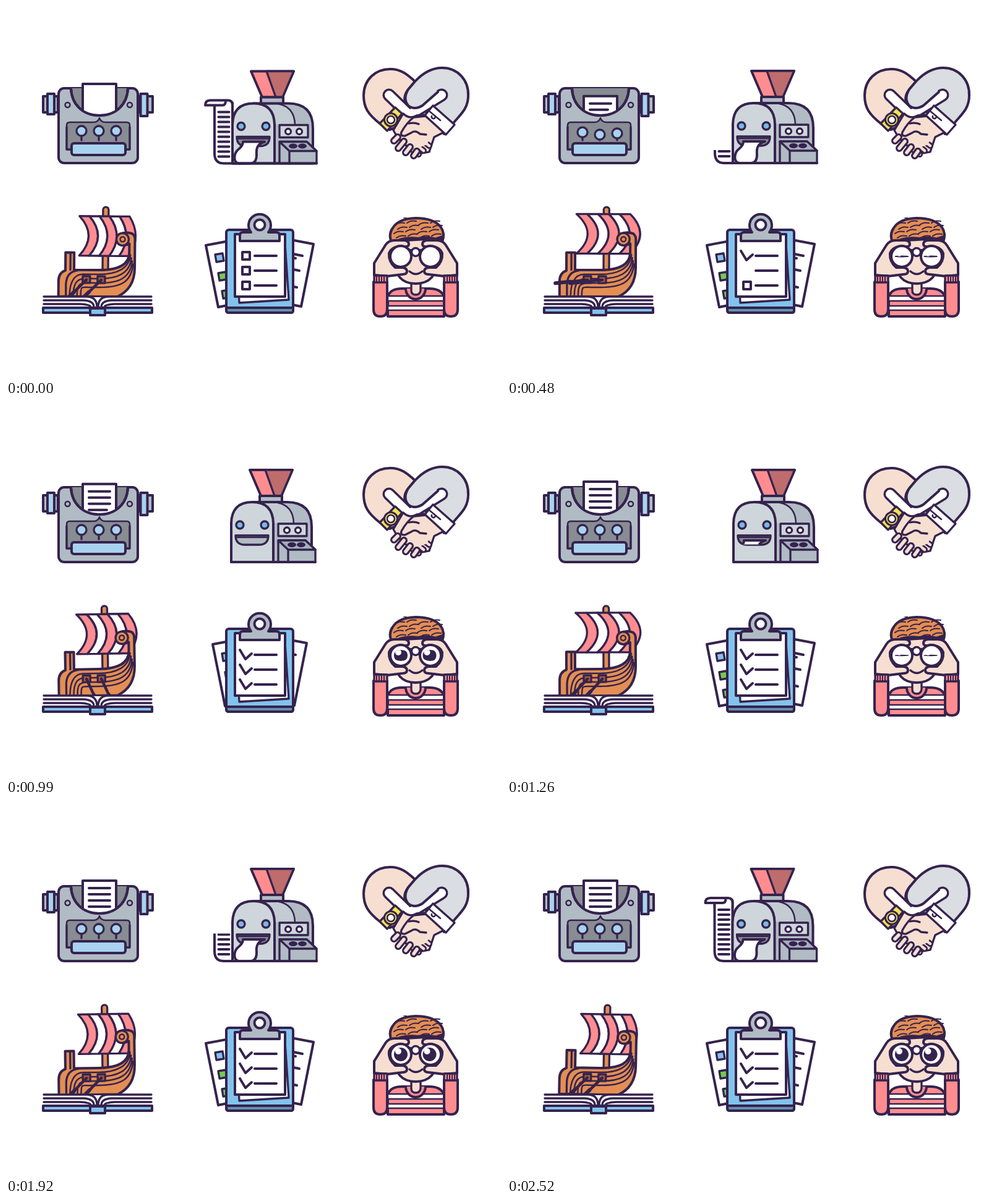
An HTML page that plays this animation: 800x600 px, repeating every 2.55 s.

```html
<!DOCTYPE html>
<html lang="en">
<head>
<meta charset="utf-8">
<title>Six icons</title>
<style>
html, body { margin: 0; width: 100%; height: 100%; overflow: hidden; background: #fff }
svg { display: block; width: 100vw; height: 100vh; stroke: #35234e; stroke-width: 4; stroke-linejoin: round; stroke-linecap: round; fill: none }
.w { fill: #fff } .g { fill: #b1bbc4 } .d { fill: #878d92 } .l { fill: #ced6db } .b { fill: #a9d2ee }
.c { fill: #82c3ec } .p { fill: #ff8d90 } .s { fill: #f6dfd1 } .o { fill: #e48e53 } .k { fill: #35234e }
.t { stroke-width: 2.5 } .m { stroke-width: 3.3 } .n { stroke: none }
</style>
</head>
<body>
<svg viewBox="0 0 800 600">
<defs>
  <clipPath id="slot"><path d="M100 90H200V133H196C195 160 176 177 151 177S106 160 105 133H100Z"/></clipPath>
  <clipPath id="tongueClip"><rect id="tongueBox" x="355" y="215" width="80"/></clipPath>
  <clipPath id="stripClip"><rect id="stripBox" width="120" height="150"/></clipPath>
  <clipPath id="curlClip"><rect id="curlBox" y="140" width="80" height="30"/></clipPath>
  <clipPath id="water"><rect x="40" y="300" width="220" height="170"/></clipPath>
  <clipPath id="lids"><ellipse id="lidL" cx="638" cy="405" rx="14"/><ellipse id="lidR" cx="685.500" cy="405" rx="14"/></clipPath>
</defs>

<g id="typewriter">
  <path class="g" d="M60 146h24v26H60zM214 146h23v26H214z"/>
  <path class="b" d="M67 142h11v33H67zM217.500 142h11v36h-11z"/>
  <rect class="g" x="85" y="133" width="128" height="121" rx="9"/>
  <path class="d" d="M105 133C106 160 125 177 151 177S196 160 197 133"/>
  <g clip-path="url(#slot)"><g id="sheet"><rect class="w" x="124" y="0" width="54" height="90"/><path id="typed"/></g></g>
  <path d="M105 133C106 160 125 177 151 177S196 160 197 133"/>
  <g class="t"><circle cx="99.500" cy="160" r="4"/><circle cx="200" cy="160" r="4"/>
  <path class="d" d="M98 232V193q0-5 5-5h38q8 0 10-7 2 7 10 7h34q5 0 5 5v39Z"/></g>
  <path class="m" d="M106 232h-8v-36M193 232h7v-36"/>
  <g id="keys" class="m b"></g>
  <rect class="b" x="106" y="222" width="87" height="19" rx="4"/>
</g>

<g id="machine">
  <g clip-path="url(#stripClip)">
    <path class="w" d="M337 156V238Q337 254 352 254H385L366 236V156"/>
    <path id="stripLines"/>
  </g>
  <g clip-path="url(#curlClip)"><path class="w" d="M337 166V160H322Q322 152 330 152H359Q366 152 366 160V168M337 160H350Q355 160 355 153"/></g>
  <path class="g" d="M400 157H456Q496 157 496 197V254H433"/>
  <path class="n" d="M400 159H441Q466 164 467 191H434Z" fill="#c3ccd2"/>
  <path class="t" d="M441 158Q466 163 467 191"/>
  <path class="l" d="M366 254V191Q367 157 400 157T434 191V254Z"/>
  <path class="p" d="M396 105H465L447 147H414Z"/>
  <path class="m" fill="#bf6c6d" d="M421 105H465L447 147H436Z"/>
  <path class="g" d="M412 147h36v10h-36z"/>
  <g class="m"><g fill="#78b8e4"><circle cx="380" cy="194" r="6"/><circle cx="420" cy="194" r="6"/></g>
  <path class="l" d="M442 192h46v20h-46z"/><circle class="w" cx="456" cy="202.500" r="4.500"/><circle class="w" cx="474" cy="202.500" r="4.500"/></g>
  <path id="mouth" class="m" d="M373 211H426Q426 226 411 226H388Q373 226 373 211Z"/>
  <path class="t" d="M376 214H423"/>
  <g clip-path="url(#tongueClip)"><path class="w" d="M383 219H418C406 222 404 230 405 240 405 249 402 254 395 254H377C367 254 367 238 376 231 381 227 383 224 383 219Z"/></g>
  <g class="m"><path class="g" d="M442 219H486L502 234V254H442Z"/><path fill="#a3afb9" d="M442 219H486L502 234H458Z"/><path d="M458 234V254"/></g>
  <g class="k n"><ellipse cx="464" cy="226" rx="7" ry="4"/><ellipse cx="479" cy="226" rx="7" ry="4"/></g>
  <path d="M366 254H502"/>
</g>

<g id="handshake">
  <path class="s" d="M604 190C585 175 578 164 578 145 578 119 597 102 621 102 638 102 648 110 661 122L690 150 650 190 620 200Z"/>
  <path fill="#dadde1" d="M661 122C675 107 689 100 705 100 730 100 748 120 747 145 747 165 736 174 725 187L708 207 672 164Q660 170 649 161 639 150 650 135Z"/>
  <path d="M619 144L652 176 704 144" style="stroke-width:21"/>
  <path d="M619 144L652 176 704 144" style="stroke:#fff;stroke-width:14"/>
  <path class="n" fill="#dadde1" d="M661 124L650 136Q641 150 650 160 660 168 673 161L697 139 690 118Z"/>
  <path d="M661 122L650 135Q641 150 650 161 660 169 673 161L698 139"/>
  <g class="m">
    <path class="s" d="M626 201L642 174Q652 184 664 177L678 176 708 204 692 212 684 236 662 240 633 213Z"/>
    <path class="s" d="M676 220l8 6M666 227l9 7M656 232l11 8" style="stroke-width:10"/>
    <path d="M676 220l8 6M666 227l9 7M656 232l11 8" style="stroke:#f6dfd1;stroke-width:4.500"/>
    <path class="n s" d="M640 196L664 182 690 206 680 224 660 232 640 216Z"/>
    <path class="s" d="M678 178L659 180Q648 188 639 204 637 211 645 210L655 205Q662 200 669 207L679 208"/>
    <path d="M651 190Q660 188 667 191"/>
    <path d="M633 212l-6 6M643 219l-9 11M653 228l-7 9M664 235l-5 7" style="stroke-width:12"/>
    <path d="M633 212l-6 6M643 219l-9 11M653 228l-7 9M664 235l-5 7" style="stroke:#f6dfd1;stroke-width:5.500"/>
    <path class="w" d="M690 161L725 192 711 208 677 177Z"/><path class="t" d="M684 170L702 185M688 178a3 3 0 1 0 5-1"/>
    <path fill="#f4e354" d="M604 190L629 164 640 174 616 202Z"/>
    <circle cx="622" cy="184" r="10.500" fill="#f4e354" style="stroke-width:3"/><circle class="w t" cx="622" cy="184" r="6"/>
  </g>
</g>

<g id="boat">
  <rect class="o m" x="156" y="325" width="9" height="105" rx="4.500"/>
  <g id="sail" class="m"></g>
  <path class="o" d="M85 470V445Q85 432 96 428V399H110V427H150C182 427 199 418 199 398V384Q190 389 182 385 175 376 182 369 194 364 204 368 209 372 208 380V423C208 448 197 462 180 470Z"/>
  <path class="m" d="M104 400V427M97 468V450Q98 430 116 428"/>
  <path id="planks" class="t"/>
  <circle class="o m" cx="188" cy="377" r="10"/><circle class="o t" cx="188" cy="377" r="4"/>
  <path class="m" fill="#a85a36" d="M124 437h12v11h-12zM148 437h12v11h-12z"/>
  <g clip-path="url(#water)"><path id="oars" style="stroke-width:4.500"/><path id="blades" style="stroke-width:6"/></g>
</g>
<g id="book">
  <path class="n w" d="M60 471h176v17H60z"/>
  <path class="c" d="M60 488H236V496H60Z"/><path class="c" d="M136 489h24v11h-24z"/>
  <path id="pages" class="m"/>
</g>

<g id="clipboard">
  <g id="leftSheet"><path class="w" d="M323 387L403 372 423 471 343 487Z"/>
    <g class="m"><path class="c" d="M338 402l12-2 2 12-12 2z"/><path fill="#74cc4e" d="M343 432l12-2 2 12-12 2zM349 461l12-2 2 12-12 2z"/></g></g>
  <g id="rightSheet"><path class="w" d="M497 385L418 370 398 470 477 486Z"/><path d="M440 396L479 404M440 402L468 408M440 421L474 428M440 449L470 455"/></g>
  <rect class="c" x="356" y="362" width="108" height="134" rx="4"/><path fill="#6292af" d="M356 488H464V493Q464 496 460 496H360Q356 496 356 492Z"/>
  <path class="w m" d="M372 372L450 370 457 475 377 480Z"/>
  <path class="w" d="M370 369h81v101h-81z"/>
  <g id="rows"></g>
  <path class="g" d="M378 380V371Q378 366 383 366H396A18 18 0 1 1 424 366H437Q442 366 442 371V380Z"/><circle class="w" cx="410" cy="354" r="8.500"/>
</g>

<g id="boy">
  <path class="p" d="M617 502V471Q620 457 640 457H684Q704 457 708 471V502Z"/>
  <path class="w t" d="M617 469H708V477H617ZM617 485H708V492H617Z"/>
  <path class="p" d="M646 457a16 17 0 0 0 32 0"/>
  <path class="s m" d="M655 440V460Q655 467 662 467T670 460V440"/>
  <path class="s" d="M628 380V410C628 436 640 449 662 449S697 436 697 410V376Z"/>
  <path class="o" d="M624 384Q617 370 625 359 634 344 662 343 692 343 703 358 710 368 705 382 692 372 666 376 640 373 624 384Z"/>
  <path id="hair" style="stroke-width:2"/>
  <path class="n k" d="M641 342h7v3zM690 376l15-5v9z"/>
  <path class="m" d="M652 429q10 9 21 0"/>
  <path d="M653 395H671"/>
  <g id="arm">
    <path class="p" d="M594 446H616V491Q616 502 605 502T594 491Z"/>
    <path class="s" d="M595 435V416L613 387Q618 379 628 379H644Q651 380 651 385T643 389Q624 387 619 400 618 414 629 423H641Q648 424 648 429T641 434L616 437Z"/>
    <path class="p m" d="M595 436h21v11h-21z"/><path style="stroke-width:2" d="M599 438v8M603 438v8M607 438v8M611 438v8"/>
    <circle class="w" cx="638" cy="405" r="17"/>
  </g>
  <use href="#arm" transform="translate(1324) scale(-1 1)"/>
  <circle class="w m" cx="662" cy="398" r="6.500"/>
  <g class="n" clip-path="url(#lids)">
    <g class="k"><circle cx="638" cy="405" r="11"/><circle cx="684.500" cy="405" r="11"/></g>
    <g class="w"><circle cx="634" cy="400" r="5"/><circle cx="680.500" cy="400" r="5"/></g>
  </g>
</g>
</svg>
<script>
const LOOP = 2550, STEP = 30;
const $ = id => document.getElementById(id);
const set = (id, attrs) => { for (const a in attrs) $(id).setAttribute(a, attrs[a]); };
const clamp = v => Math.max(0, Math.min(1, v));
const times = (n, f) => Array.from({ length: n }, (_, i) => f(i)).join('');

// Piecewise curve through [time, value] pairs.
function track(t, pts, ease = u => u) {
  const i = pts.findIndex(p => p[0] > t);
  if (i === 0) return pts[0][1];
  if (i < 0) return pts[pts.length - 1][1];
  const [t0, a] = pts[i - 1], [t1, b] = pts[i];
  return a + (b - a) * ease((t - t0) / (t1 - t0));
}
const smooth = u => u * u * (3 - 2 * u);

// Static repeats
set('stripLines', { d: times(10, i => `M343.500 ${171 + 8 * i}H360.500`) });
set('pages', { d: times(3, i => {
  const y = 470 + 6 * i, foot = 1 + 5 * i, bend = 16 + 6 * i;
  const half = side => `M${148 + 87 * side} ${y}H${148 + bend * side}Q${148 + foot * side} ${y + 1} ${148 + foot * side} 487`;
  return half(-1) + half(1);
}) });
set('planks', { d: times(4, i => {
  const y = 434 + 7 * i;
  return `M${103 + 6 * i} 468C${103 + 6 * i} 452 ${108 + 5 * i} ${y} ${124 + 4 * i} ${y}H150C${178 + 3 * i} ${y} ${199 + i} ${y - 9} ${201 + 1.5 * i} ${402 + 5 * i}`;
}) });
set('hair', { d: times(16, i => {
  const row = i >> 2, x = 629 + 19 * (i % 4) + 5 * (row % 2) - row, y = 354 + 7 * row - 3 * (i % 2);
  return `M${x} ${y}q6-5 15-3`;
}) });

function typewriter(t) {
  const y = track(t, [[0, 126], [120, 158.5], [1100, 124]]);
  set('sheet', { transform: `translate(0 ${y})` });
  set('typed', { d: times(4, i => {
    const p = clamp((t - 255 * i - (i ? 55 : 120)) / (i ? 200 : 135));
    return p ? `M134 ${12 + 10 * i}h${34 * p}` : '';
  }) });
  const active = t > 60 && t < 960;
  $('keys').innerHTML = times(3, i => {
    const phase = [-1.2, 0, .84][i], x = 122 + 28 * i;
    const cy = 202 + (active ? 6 * Math.max(0, Math.cos(t / 240 * 2 * Math.PI - phase)) : 0);
    return `<path d="M${x} ${cy + 9}V217"/><circle cx="${x}" cy="${cy}" r="8"/>`;
  });
}

function machine(t) {
  const dx = track(t, [[0, 0], [240, -2], [480, -1], [720, 0], [990, -2], [1260, 0], [1680, -2.5], [1920, 0], [2100, -1], [2190, 0], [2520, -1.5]], smooth);
  const dy = track(t, [[0, .5], [480, 0], [1440, 0], [1680, 1.2], [1920, 0]], smooth);
  set('machine', { transform: `translate(${dx} ${dy})` });
  const len = track(t, [[0, 225], [480, 106], [930, 0], [1230, 0], [1260, 8], [1680, 81], [2190, 184], [2400, 225]]);
  set('tongueBox', { height: len ? 4 + Math.min(len, 50) * .8 : 0 });
  const left = len < 89 ? 376 - Math.max(0, len - 50) : 330;
  set('stripBox', { x: left, y: Math.max(150, Math.min(251, 250 - (len - 89))), width: len > 50 ? 430 - left : 0 });
  set('curlBox', { x: len > 187 ? 368 - 49 * (len - 187) / 38 : 400 });
  set('mouth', { fill: len ? '#878d92' : '#b1bbc4' });
}

function boat(t) {
  const tilt = track(t, [[0, .5], [480, .2], [990, -.9], [1260, -.2], [1680, -1.1], [2190, -.4], [2520, 1.1]], smooth);
  set('boat', { transform: `rotate(${tilt} 150 430)` });

  const wind = track(t, [[0, 0], [480, 1], [990, .5], [1260, 1.15], [1680, 0], [2190, .1], [2520, 0]], smooth);
  const top = 340 - 3.5 * wind, low = top + 64, mid = top + 32;
  const x = k => 118 - 6 * wind + k * (16.2 + 1.2 * wind);
  const bow = k => x(k) + 2 * (15 - k + wind * (3 + .6 * k));
  $('sail').innerHTML = times(5, k =>
    `<path class="${k % 2 ? 'w' : 'p'}" d="M${x(k)} ${top}H${x(k + 1)}Q${bow(k + 1)} ${mid} ${x(k + 1)} ${low}H${x(k)}Q${bow(k)} ${mid} ${x(k)} ${top}Z"/>`);

  const a = track(t, [[0, 45], [480, 84], [990, -24], [1230, 43], [1500, 45]], smooth) * Math.PI / 180;
  const at = (px, r) => `${px - r * Math.sin(a)} ${443 + r * Math.cos(a)}`;
  const oar = (r0, r1) => [130, 154].map(px => `M${at(px, r0)}L${at(px, r1)}`).join('');
  set('oars', { d: oar(0, 50) });
  set('blades', { d: oar(28, 52) });
}

function clipboard(t) {
  const tuck = track(t, [[600, 0], [870, 16], [990, 11], [1170, 0]], smooth);
  set('leftSheet', { transform: `translate(${tuck})` });
  set('rightSheet', { transform: `translate(${-tuck})` });
  $('rows').innerHTML = times(3, i => {
    const y = 404 + 24 * i, start = 180 + 210 * i;
    const half = 6 * (1 - clamp((t - start) / 90)), p = clamp((t - start - 90) / 120);
    const box = half ? `<path d="M${388 - half} ${y - half}h${2 * half}v${2 * half}h${-2 * half}z"/>` : '';
    const tick = p ? `<path pathLength="1" stroke-dasharray="${p} 2" d="M378 ${y - 8}L387 ${y + 7} 397 ${y - 2}"/>` : '';
    return box + tick + `<path d="M402 ${y}H437"/>`;
  });
}

function boy(t) {
  const ry = track(t, [[390, 0], [480, 1.5], [720, 15], [870, 15], [990, 9], [1200, 1.2], [1260, 1.2], [1500, 15]]);
  set('lidL', { ry });
  set('lidR', { ry });
}

const parts = [typewriter, machine, boat, clipboard, boy];
const begin = performance.now();
function frame() {
  const t = Math.floor((performance.now() - begin) % LOOP / STEP) * STEP;
  parts.forEach(draw => draw(t));
  requestAnimationFrame(frame);
}
frame();
</script>
</body>
</html>
```
